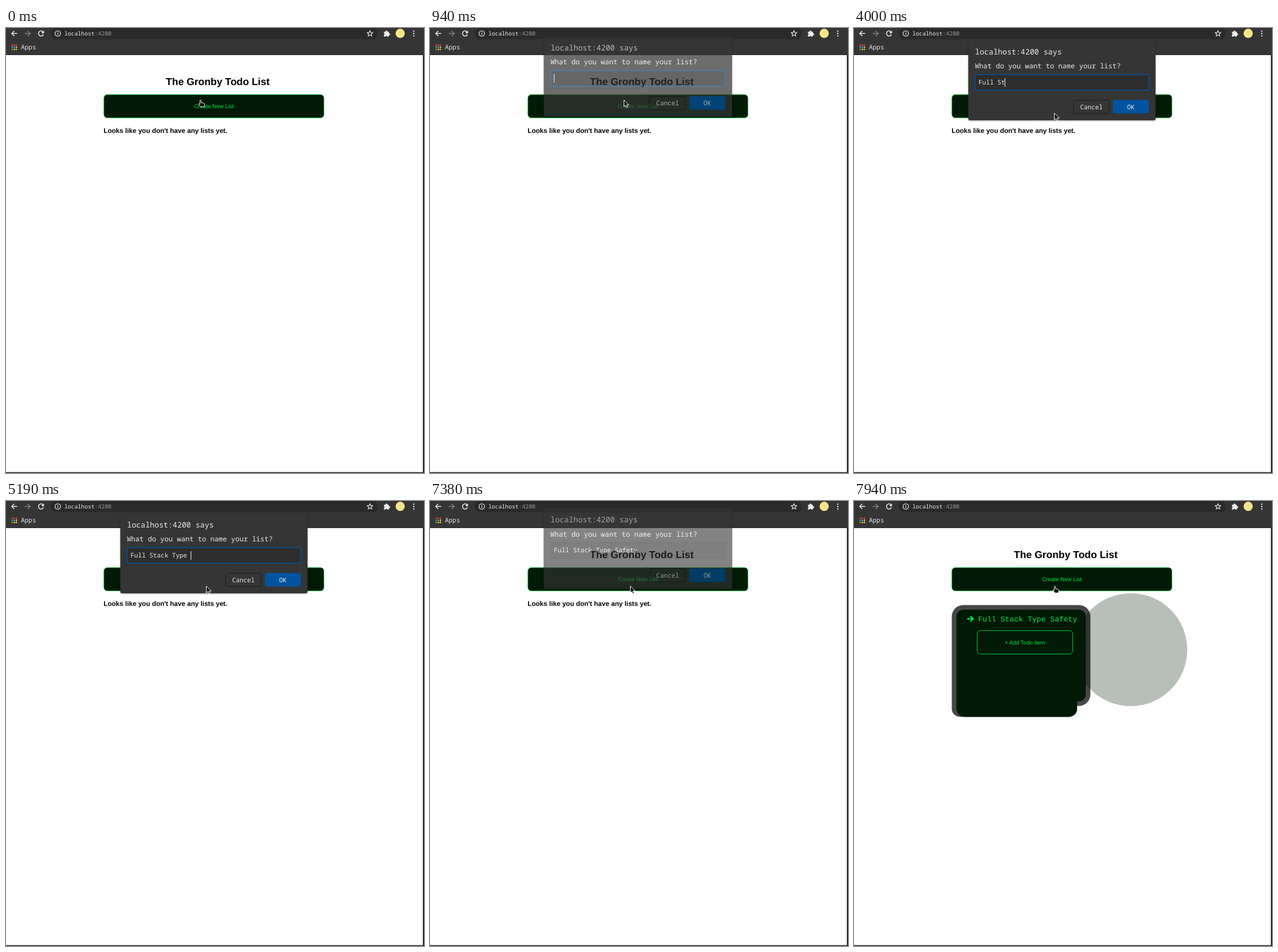
Animation of 725x772 px, one loop 8000 ms. Source, as an HTML page:

```html
<!DOCTYPE html>
<html lang="en">
<head>
<meta charset="utf-8">
<title>Todo list</title>
<style>
  html, body { margin: 0; width: 100%; height: 100%; overflow: hidden; background: #fff; }
  svg { display: block; width: 100%; height: 100%; }
  text { text-rendering: geometricPrecision; white-space: pre; }
  .sans { font-family: "Liberation Sans", Arial, sans-serif; font-size: 9.7px; fill: #00e640; }
  .bold { font-weight: 700; fill: #000; }
  .mono { font-family: "Noto Sans Mono", "DejaVu Sans Mono", monospace; font-size: 10.91px; fill: #e8eaed; }
  .mid { text-anchor: middle; }
  .icon { fill: none; stroke: #f1f1f1; stroke-width: 1.5; }
  .cursor { fill: #000; stroke: #fff; stroke-width: 1; stroke-linejoin: round; }
</style>
</head>
<body>
<svg viewBox="0 0 725 772" preserveAspectRatio="none">
  <rect width="725" height="772" fill="#fff"/>

  <!-- Page -->
  <text class="sans bold mid" x="367.3" y="99.3" style="font-size:17.46px">The Gronby Todo List</text>
  <rect x="169.8" y="115.6" width="381.6" height="40.3" rx="5.8" fill="#001a06" stroke="#00c838" stroke-width=".8"/>
  <text class="sans mid" x="360.6" y="139.2">Create New List</text>
  <text id="empty" class="sans bold" x="169.3" y="181.7" style="font-size:11.64px">Looks like you don't have any lists yet.</text>

  <circle id="emblem" cx="480" cy="258" r="98" fill="#001a06"/>
  <g id="card">
    <path id="frame" fill="#000" fill-opacity=".72"/>
    <path id="panel" fill="#001a06"/>
    <g id="listName">
      <path d="M196.2 -4.6H206.5M202 -9.1L206.6 -4.6L202 -.1" fill="none" stroke="#00e640" stroke-width="2.3"/>
      <text class="sans" x="215.2" style="font-family:'Liberation Mono','Courier New',monospace;font-size:13.04px">Full Stack Type Safety</text>
    </g>
    <rect x="213.7" y="224.8" width="165.6" height="40.6" rx="5.8" fill="none" stroke="#00e640" stroke-width=".9"/>
    <text class="sans mid" x="296.5" y="248.6">+ Add Todo Item</text>
  </g>

  <!-- Browser frame -->
  <rect width="725" height="47" fill="#353535"/>
  <rect x="77" y="-1" width="568" height="20.5" rx="10" fill="#2a2a2a"/>
  <rect y="46" width="725" height="1" fill="#292929"/>
  <rect x="723" y="47" width="2" height="725" fill="#2c2a2c"/>
  <rect y="770.5" width="725" height="1.5" fill="#2c2a2c"/>
  <path class="icon" d="M19.5 9.5H10M14.4 5L9.9 9.5L14.4 14"/>
  <path class="icon" d="M32.5 9.5H42M37.6 5L42.1 9.5L37.6 14" style="stroke:#858585"/>
  <path class="icon" d="M64.2 6.7A4.4 4.4 0 1 0 65 10.7"/>
  <path d="M65.8 4.3V8.9H61.2Z" fill="#f1f1f1"/>
  <circle class="icon" cx="89.8" cy="9.5" r="4.8" style="stroke-width:1.1"/>
  <path class="icon" d="M89.8 8.8V12.2M89.8 6.5V7.8" style="stroke-width:1.2"/>
  <text class="mono" x="101.2" y="13" style="font-size:9.73px">localhost<tspan fill="#969696">:4200</tspan></text>
  <path id="star" class="icon" style="stroke-width:1.1;stroke-linejoin:round"/>
  <path d="M655.5 6.5H658.4V5.8A1.5 1.5 0 0 1 661.4 5.8V6.5H664.2V9.2H664.8A1.5 1.5 0 0 1 664.8 12.2H664.2V14.8H661.3A1.6 1.6 0 0 0 658.3 14.8H655.5V12A1.6 1.6 0 0 0 655.5 9Z" fill="#f1f1f1"/>
  <circle cx="683.7" cy="9.3" r="8" fill="#f7e58c"/>
  <g id="dots" fill="#f1f1f1"></g>
  <g id="apps"></g>
  <text class="mono" x="26" y="37.2">Apps</text>

  <!-- Prompt -->
  <g id="dialog">
    <rect x="198.3" y="22" width="324.7" height="138" rx="3" fill="#353535" style="filter:drop-shadow(0 1px 1.2px rgba(0,0,0,.45))"/>
    <text class="mono" x="210" y="46.4" style="font-size:13.2px">localhost:4200 says</text>
    <text class="mono" x="209.8" y="70.3" style="font-size:12.05px">What do you want to name your list?</text>
    <rect id="field" x="210" y="80.8" width="301" height="27" rx="2" fill="#2d2d2d" stroke-width="1.5"/>
    <text id="typed" class="mono" x="216" y="97.7"></text>
    <rect id="caret" y="87" width="1" height="15" fill="#fff"/>
    <rect x="381" y="125.3" width="61.7" height="22.8" rx="2.5" fill="#353535" stroke="#1c1c1c"/>
    <text class="mono mid" x="411.8" y="140.6">Cancel</text>
    <rect x="449" y="125" width="62.3" height="23.3" rx="2.5" fill="#00539f"/>
    <text class="mono mid" x="480.2" y="140.6">OK</text>
  </g>

  <path id="arrow" class="cursor" d="M.5 .5V12.2L3.2 9.7L5 13.7L7 12.8L5.2 8.9H9Z"/>
  <path id="hand" class="cursor" d="M3 .8C4 .3 4.8 .9 4.9 2V5L9.5 6.2C10.6 6.6 10.8 7.2 10.7 8.2L10 12.5H4.2L.6 8.2C.4 7.2 1.2 6.8 2 7.3L2.8 8V1.5Z"/>
</svg>

<script>
const LOOP = 8000, STEP = 62.5;
const NAME = 'Full Stack Type Safety', CHAR_WIDTH = 6.546;
const KEY_TIMES = [1630, 2630, 2810, 2940, 3060, 3750, 4000, 4190, 4250, 4380, 4440,
  4690, 4810, 4880, 5060, 5190, 5440, 5750, 5940, 6190, 6380, 6690];
const CARET_OFF = [[2190, 2630], [3560, 3750], [7190, LOOP]];

const OPEN = 687, CLOSE = 7250, FADE = 345;   // prompt window
const LISTED = 7490;                          // card replaces the empty note
// time, x, y
const POINTER = [[0, 336, 124.5], [1000, 336, 124.5], [1375, 346, 147], [3810, 346, 147], [3875, 347, 147.2]];

const $ = id => document.getElementById(id);
const show = (id, on) => $(id).setAttribute('visibility', on ? 'visible' : 'hidden');
const place = (id, x, y) => $(id).setAttribute('transform', `translate(${x} ${y})`);
const ramp = (t, from, length) => Math.min(1, Math.max(0, (t - from) / length));

function sample(table, t) {
  const next = table.findIndex(row => row[0] > t);
  if (next < 0) return table.at(-1).slice(1);
  const a = table[next - 1], b = table[next];
  const k = ramp(t, a[0], b[0] - a[0]);
  return a.slice(1).map((v, i) => v + (b[i + 1] - v) * k);
}

function dot(parent, cx, cy, r, fill) {
  const c = document.createElementNS('http://www.w3.org/2000/svg', 'circle');
  Object.entries({ cx, cy, r }).forEach(([k, v]) => c.setAttribute(k, v));
  if (fill) c.setAttribute('fill', fill);
  $(parent).append(c);
}

function drawIcons() {
  for (let i = 0; i < 3; i++) dot('dots', 707.3, 5.4 + i * 4.1, 1.2);
  const colors = ['#e8453c', '#e8453c', '#e8453c', '#35a853', '#4285f4', '#f9bb2d', '#35a853', '#f9bb2d', '#f9bb2d'];
  colors.forEach((c, i) => dot('apps', 10.7 + i % 3 * 3.7, 29.8 + Math.floor(i / 3) * 3.7, 1.4, c));
  const tips = Array.from({ length: 10 }, (_, i) => {
    const a = i * Math.PI / 5 - Math.PI / 2, r = i % 2 ? 2.3 : 5.3;
    return `${631.3 + r * Math.cos(a)} ${9.8 + r * Math.sin(a)}`;
  });
  $('star').setAttribute('d', `M${tips.join('L')}Z`);
}

// Rounded tab over a taller sheet whose bottom edge stays put
function cardPath(left, right, top, bottom, r, sheetBottom) {
  return `M${left} ${top + r}a${r} ${r} 0 0 1 ${r} ${-r}H${right - r}a${r} ${r} 0 0 1 ${r} ${r}` +
    `V${bottom - r}a${r} ${r} 0 0 1 ${-r} ${r}H387V${sheetBottom - 14}a14 14 0 0 1 -14 14` +
    `H${left + 14}a14 14 0 0 1 -14 -14Z`;
}

// The window glides down into place while it fades in, and back up while it fades out
function drawDialog(q) {
  const p = ramp(q, OPEN, FADE) - ramp(q, CLOSE - 10, FADE);
  const away = 1 - p ** 4;
  $('dialog').setAttribute('opacity', p);
  $('dialog').setAttribute('transform', `translate(360.6 ${22 - 10.8 * away}) ` +
    `scale(${1 + .008 * away} ${1 + .015 * away}) translate(-360.6 -22)`);
  show('dialog', p > 0);
}

function drawTyping(t) {
  const count = KEY_TIMES.filter(k => k <= t).length;
  $('typed').textContent = NAME.slice(0, count);
  $('caret').setAttribute('x', 215.6 + count * CHAR_WIDTH);
  $('caret').setAttribute('opacity', CARET_OFF.some(([a, b]) => t >= a && t < b) ? 0 : 1);
  $('field').setAttribute('stroke', t < CLOSE ? '#00539f' : '#292929');
}

function drawCard(t, q) {
  const entered = ramp(q, 7500, 437.5);
  const drop = 3.2 * entered;
  show('empty', t < LISTED);
  show('card', t >= LISTED);
  $('emblem').setAttribute('opacity', .28 * entered);
  $('frame').setAttribute('d', cardPath(169.6, 410, 177.3 + drop, 352.3 + drop, 20, 374.4));
  $('panel').setAttribute('d', cardPath(177.6, 402, 185.3 + drop, 344.6 + drop, 12, 374.4));
  place('listName', 0, 205.8 + drop);
}

function drawPointer(t, q) {
  const [x, y] = sample(POINTER, q);
  const pointing = t < 560 || t >= LISTED;
  show('hand', pointing);
  show('arrow', !pointing);
  place('hand', x - 2.4, y - .2);
  place('arrow', x, y);
}

function draw(t) {
  const q = Math.floor(t / STEP + .01) * STEP;
  drawDialog(q);
  drawTyping(t);
  drawCard(t, q);
  drawPointer(t, q);
}

drawIcons();
const start = performance.now();
function tick() {
  draw((performance.now() - start) % LOOP);
  requestAnimationFrame(tick);
}
tick();
</script>
</body>
</html>
```
